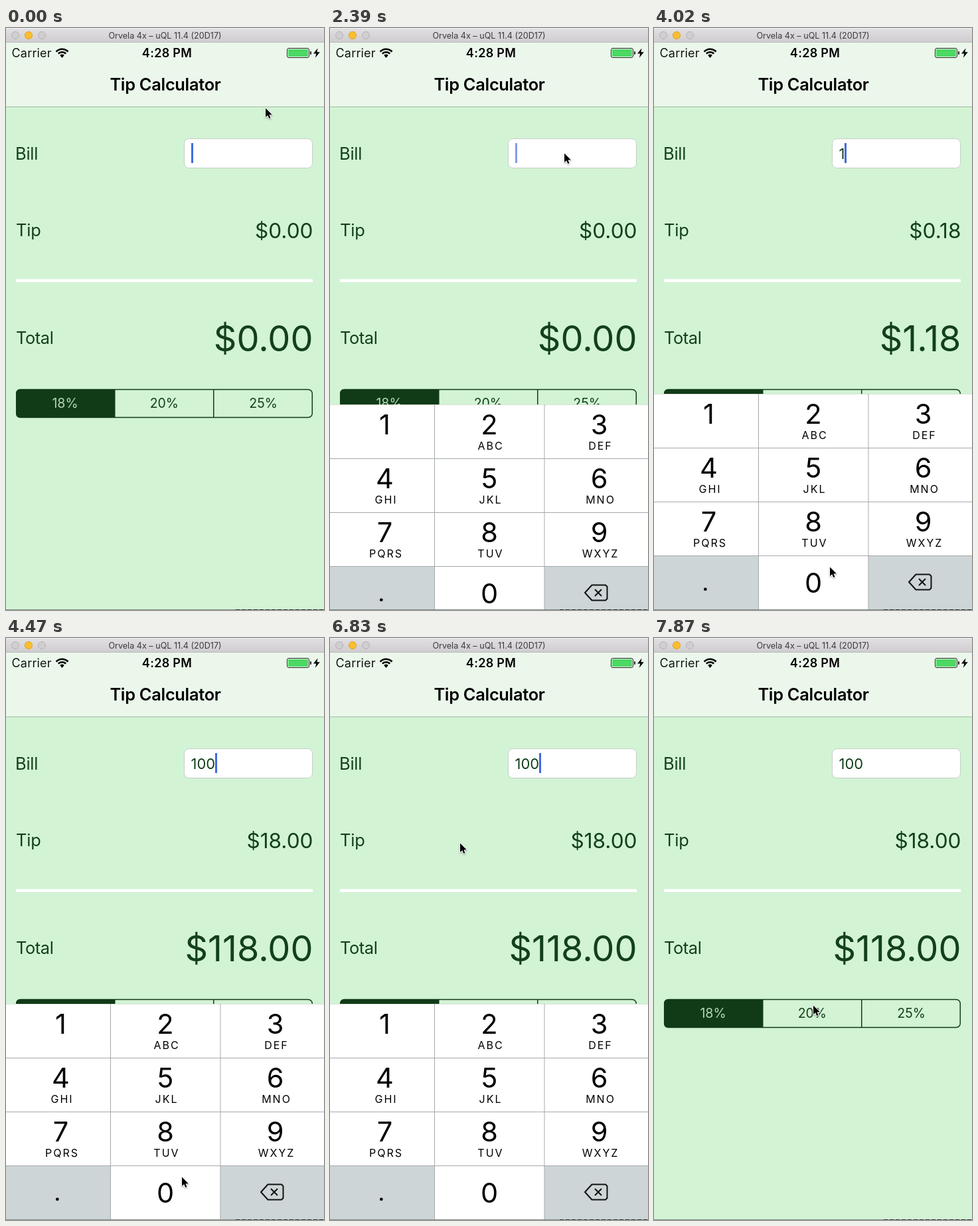
An HTML page with a canvas for the animation above (8000 ms loop, 479 by 875 pixels).

```html
<!DOCTYPE html>
<html lang="en">
<head>
<meta charset="utf-8">
<title>Tip Calculator</title>
<style>
html, body { margin: 0; width: 100%; height: 100%; overflow: hidden; background: #d3f3d5; }
canvas { display: block; width: 479px; height: 875px; }
</style>
</head>
<body>
<canvas id="stage"></canvas>
<script>
const W = 479, H = 875, LOOP = 8000;
const FONT = 'Inter, Roboto, sans-serif';
const MINT = '#d3f3d5', GREEN = '#12401a', DARK = '#113b17';
const canvas = document.getElementById('stage');
const ctx = canvas.getContext('2d');
const dpr = window.devicePixelRatio || 1;
canvas.width = W * dpr;
canvas.height = H * dpr;

const SHORT_TICKS = [7, 22, 25, 34, 39, 42, 44, 51];
const LAST_TICK = 53;

// Pointer stops: tick, x, y, and 1 for a move at constant speed.
const POINTER = [
  [0, 390, 119], [4, 352, 187], [19, 352, 187], [23, 92, 590], [25, 92, 590],
  [27, 264, 809], [32, 264, 809], [36, 342, 524], [37, 342, 524],
  [40, 311, 397, 1], [45, 199, 323, 1], [46, 195, 307], [48, 195, 307], [53, 239, 551]
];

// Caret opacity from a given tick on.
const CARET = [
  [0, 1], [10, 0.65], [11, 0], [13, 0.65], [14, 1], [16, 0.65], [17, 0],
  [20, 0.65], [21, 1], [23, 0.65], [24, 0], [25, 1], [34, 0.65], [35, 0],
  [38, 0.65], [39, 1], [41, 0.65], [42, 0], [45, 1], [48, 0]
];
const BILL = [[0, ''], [25, '1'], [29, '10'], [30, '100']];
const PRESSED = [[0, ''], [24, '1'], [25, ''], [28, '0'], [30, '']];

const KEYS = ['1', '2 ABC', '3 DEF', '4 GHI', '5 JKL', '6 MNO', '7 PQRS', '8 TUV', '9 WXYZ', '.', '0', 'del'];
const COLS = [0, 157.5, 323, W];
const KEY_X = [82.5, 240, 405.5];
const KEY_H = 81, PAD_TOP = 550;

function tickAt(time) {
  let tick = 0, start = 0;
  while (tick < LAST_TICK) {
    const next = start + (SHORT_TICKS.includes(tick) ? 140 : 150);
    if (next > time) break;
    start = next;
    tick++;
  }
  return { tick, start };
}

function valueAt(steps, tick) {
  let value = steps[0][1];
  for (const [from, v] of steps) if (tick >= from) value = v;
  return value;
}

function pointerAt(tick) {
  const i = Math.max(1, POINTER.findIndex(p => p[0] >= tick));
  const a = POINTER[i - 1], b = POINTER[i];
  const u = (tick - a[0]) / (b[0] - a[0]);
  const e = b[3] ? u : u * u * (3 - 2 * u);
  return [a[1] + (b[1] - a[1]) * e, a[2] + (b[2] - a[2]) * e];
}

// Critically damped spring from 1 to 0.
function spring(ms) {
  const x = Math.max(0, ms) * 0.01826;
  return (1 + x) * Math.exp(-x);
}

function padTop(time) {
  const hidden = H - PAD_TOP;
  const part = time < 6982 ? spring(time - 2130) : 1 - spring(time - 6982);
  return Math.round(PAD_TOP + hidden * part);
}

function rect(x, y, w, h, color) {
  ctx.fillStyle = color;
  ctx.fillRect(x, y, w, h);
}

function box(x, y, w, h, r, fill, stroke, line = 1) {
  ctx.beginPath();
  ctx.roundRect(x, y, w, h, r);
  if (fill) { ctx.fillStyle = fill; ctx.fill(); }
  if (stroke) { ctx.strokeStyle = stroke; ctx.lineWidth = line; ctx.stroke(); }
}

function shape(points) {
  ctx.beginPath();
  points.forEach(([x, y], i) => i ? ctx.lineTo(x, y) : ctx.moveTo(x, y));
  ctx.closePath();
}

function text(str, x, y, size, { color = GREEN, align = 'left', weight = 400, track = 0 } = {}) {
  ctx.font = `${weight} ${size}px ${FONT}`;
  ctx.letterSpacing = track + 'px';
  ctx.textAlign = align;
  ctx.fillStyle = color;
  ctx.fillText(str, x, y);
}

function drawTitleBar() {
  const shade = ctx.createLinearGradient(0, 0, 0, 21);
  shade.addColorStop(0, '#e2e0e2');
  shade.addColorStop(1, '#cfcdcf');
  rect(0, 0, W, 21, shade);
  rect(0, 0, W, 1, '#f2f2f2');
  rect(0, 21, W, 1, '#b9bbb9');
  [['#d0ced0', '#b4b2b4'], ['#fdbe2f', '#dfa023'], ['#d0ced0', '#b4b2b4']].forEach(([fill, edge], i) => {
    box(8.5 + i * 20, 5.5, 11, 11, 5.5, fill, edge);
  });
  text('Orvela 4x – uQL 11.4 (20D17)', 239.5, 16, 12.6, { color: '#3c3c3c', align: 'center' });
}

function drawStatus() {
  text('Carrier', 8.5, 44, 18, { color: '#101410', track: 0.2 });
  text('4:28 PM', 242.5, 44, 18, { color: '#000', align: 'center', weight: 600, track: 0.3 });

  ctx.strokeStyle = '#000';
  ctx.lineWidth = 2.6;
  for (const r of [12.3, 7.8]) {
    ctx.beginPath();
    ctx.arc(84.5, 44, r, -Math.PI * 0.76, -Math.PI * 0.24);
    ctx.stroke();
  }
  ctx.beginPath();
  ctx.moveTo(84.5, 45);
  ctx.arc(84.5, 44, 4.4, -Math.PI * 0.76, -Math.PI * 0.24);
  ctx.fillStyle = '#000';
  ctx.fill();

  box(423.5, 30.5, 33, 14, 2.5, '#ecf7ec', '#1c241c');
  box(425, 32, 30, 11, 1.2, '#4cd964');
  box(458, 35, 2, 5, 1, '#1c241c');
  shape([[469.5, 30.5], [463, 38.6], [467.3, 38.6], [465.8, 44.8], [472.8, 36.2], [468.4, 36.2]]);
  ctx.fillStyle = '#000';
  ctx.fill();
}

function drawHeader() {
  rect(0, 22, W, 96, '#ecf7ec');
  rect(0, 118, W, 1, '#9dbfa2');
  drawTitleBar();
  drawStatus();
  text('Tip Calculator', 240, 94, 25.4, { color: '#000', align: 'center', weight: 600, track: -0.3 });
}

function drawForm(tick) {
  const bill = valueAt(BILL, tick);
  const tip = Number(bill) * 0.18;
  const total = Number(bill) + tip;

  text('Bill', 14, 197.5, 25.4, { track: -0.2 });
  text('Tip', 15, 313, 25.4, { track: -0.2 });
  text('Total', 15, 475, 25.4, { track: -0.4 });

  box(268.5, 166.5, 193, 44, 7, '#fff', '#c3d0c5');
  text(bill, 278.5, 197, 22);
  const caretX = 279 + Math.max(0, Math.round(ctx.measureText(bill).width) - 1);
  ctx.globalAlpha = valueAt(CARET, tick);
  rect(caretX, 173, 3, 30, '#4169e1');
  ctx.globalAlpha = 1;

  text('$' + tip.toFixed(2), 462.5, 315.5, 31.6, { align: 'right' });
  rect(15, 377.5, 447, 4.5, '#fff');
  text('$' + total.toFixed(2), 462.5, 486, 54, { align: 'right' });

  box(15, 543, 149, 43, [6, 0, 0, 6], DARK);
  box(15.7, 543.4, 445.6, 42, 6, null, DARK, 1.5);
  rect(163, 543, 1.5, 43, DARK);
  rect(312, 543, 1.5, 43, DARK);
  ['18%', '20%', '25%'].forEach((label, i) => {
    text(label, 89 + i * 149.3, 571, 19.5, { align: 'center', color: i ? GREEN : '#b3d6b5' });
  });
}

function drawDelete(y) {
  ctx.strokeStyle = '#111';
  ctx.lineWidth = 2;
  ctx.lineJoin = 'round';
  shape([[384, y], [394.5, y - 11.5], [415, y - 11.5], [417.5, y - 9], [417.5, y + 9], [415, y + 11.5], [394.5, y + 11.5]]);
  ctx.stroke();
  ctx.beginPath();
  for (const s of [-1, 1]) {
    ctx.moveTo(399, y - 5 * s);
    ctx.lineTo(409, y + 5 * s);
  }
  ctx.stroke();
}

function drawPad(top, pressed) {
  if (top >= H) return;
  rect(0, top, W, H - top, '#fff');
  KEYS.forEach((key, i) => {
    const col = i % 3, row = Math.floor(i / 3);
    const x = KEY_X[col], y = top + row * KEY_H;
    const [digit, letters] = key.split(' ');
    if (digit === pressed || key === '.' || key === 'del') {
      rect(COLS[col], y, COLS[col + 1] - COLS[col], KEY_H, '#cdd5d7');
    }
    if (key === 'del') drawDelete(y + 40);
    else if (key === '.') box(75, y + 48.5, 4.6, 4.6, 2, '#000');
    else text(digit, x, y + (row === 3 ? 56 : 45), 41.5, { color: '#000', align: 'center' });
    if (letters) text(letters, x + 2, y + 67.5, 16, { color: '#000', align: 'center', track: 2 });
  });
  for (let row = 0; row < 4; row++) rect(0, top + row * KEY_H, W, 1, row ? '#a5a9ac' : '#dbe3dc');
  rect(157, top, 1, H - top, '#a5a9ac');
  rect(322.5, top, 1, H - top, '#a5a9ac');
}

function drawBottomEdge() {
  rect(0, 874, W, 1, '#7d8a80');
  for (let x = 346; x < W; x += 9) rect(x, 874, 6, 1, '#20262a');
}

function drawPointer([x, y]) {
  ctx.save();
  ctx.translate(x + 1, y + 1.5);
  shape([[0, 0], [0, 13.6], [3.2, 10.7], [5.3, 15.6], [7.5, 14.7], [5.5, 9.9], [9.8, 9.7]]);
  ctx.lineJoin = 'round';
  ctx.lineWidth = 2;
  ctx.strokeStyle = '#fff';
  ctx.shadowColor = 'rgba(0,0,0,0.35)';
  ctx.shadowBlur = 2 * dpr;
  ctx.shadowOffsetY = dpr;
  ctx.stroke();
  ctx.shadowColor = 'transparent';
  ctx.fillStyle = '#000';
  ctx.fill();
  ctx.restore();
}

function draw(now) {
  const { tick, start } = tickAt(now % LOOP);
  ctx.setTransform(dpr, 0, 0, dpr, 0, 0);
  rect(0, 0, W, H, MINT);
  drawHeader();
  drawForm(tick);
  drawPad(padTop(start), valueAt(PRESSED, tick));
  drawBottomEdge();
  drawPointer(pointerAt(tick));
}

let origin = null;
function loop(now) {
  if (origin === null) origin = now;
  draw(now - origin);
  requestAnimationFrame(loop);
}
draw(0);
requestAnimationFrame(loop);
</script>
</body>
</html>
```
